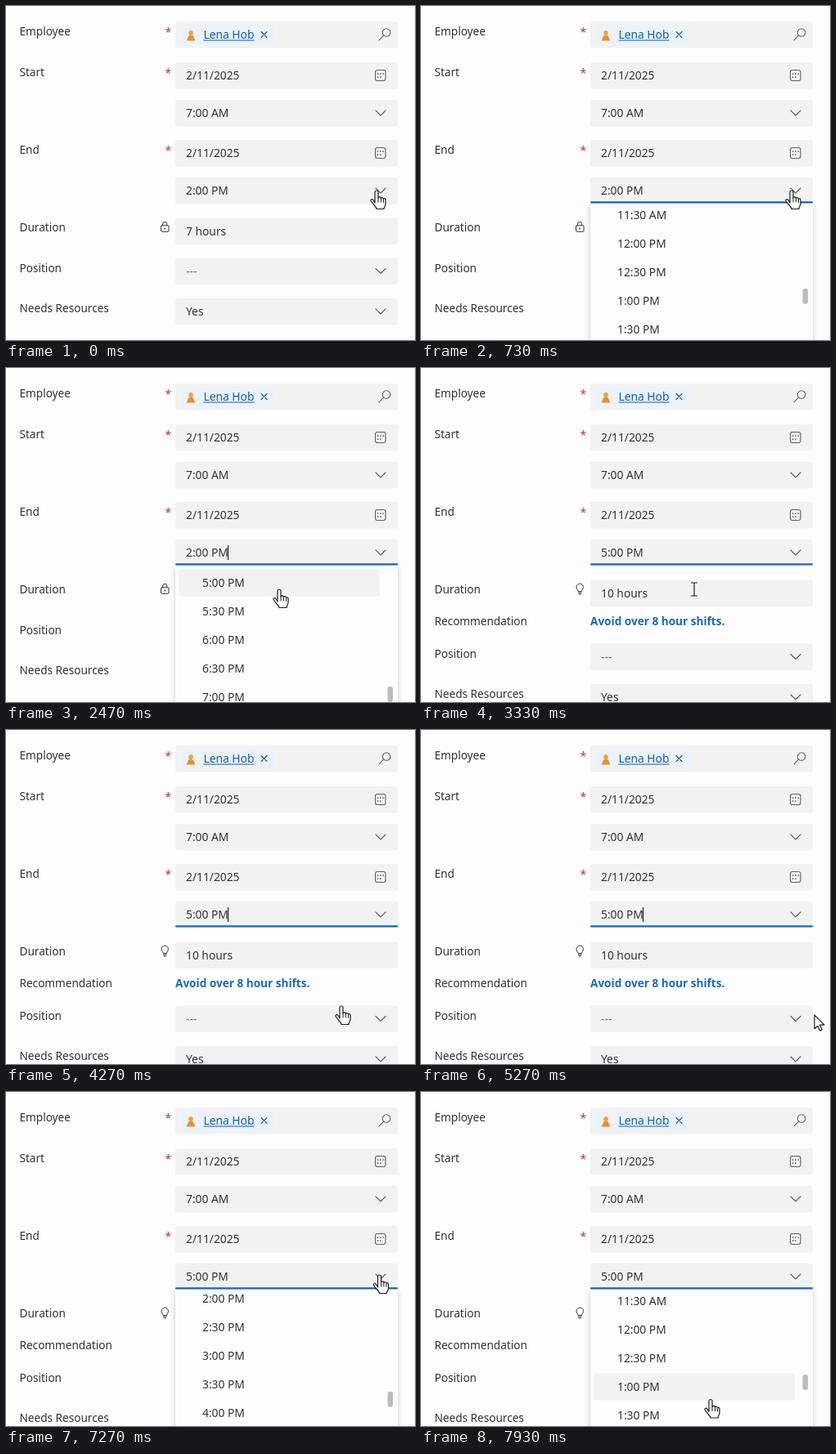
An HTML page with a canvas for the animation above (8000 ms loop, 500 px wide and 409 px high).

```html
<!DOCTYPE html>
<html lang="en">
<head>
<meta charset="utf-8">
<title>Shift form</title>
<style>
  html, body { margin: 0; width: 100%; height: 100%; overflow: hidden; background: #fefdfe; }
  canvas { display: block; width: 500px; height: 409px; }
</style>
</head>
<body>
<canvas id="stage"></canvas>
<script>
const W = 500, H = 409, LOOP = 8000;
const canvas = document.getElementById('stage');
const ctx = canvas.getContext('2d');
const ratio = window.devicePixelRatio || 1;
canvas.width = W * ratio;
canvas.height = H * ratio;

const INK = '#333133', ICON = '#5f5d60', FIELD = '#f3f2f3', BLUE = '#115ea3';
const FAMILY = '"Noto Sans", "Open Sans", sans-serif';
const ROW = 35, FIRST_ROW = 23, LIST_TOP = 242, SCROLLED = 378;

const HAND = new Path2D('M-2 15V2a2 2 0 0 1 4 0V9c0-1.5 3.2-1.5 3.4.4 .5-1.2 3-.9 3.1.9 .6-1 2.5-.6 2.5 1.2V16c0 3-2 4-2 6.5H0C0 20-4.5 17-7 12.5c-.6-1.6 1.6-2.6 2.8-1.2z');
const KNUCKLES = new Path2D('M2 9v5M5.4 10v4M8.5 11v3.5');
const ARROW = new Path2D('M0 0V17l4-3.8 2.6 6 2.6-1.1-2.6-6H12z');
const IBEAM = new Path2D('M-3.5-8H-1Q0-8 0-7Q0-8 1-8H3.5M0-7V7M-3.5 8H-1Q0 8 0 7Q0 8 1 8H3.5');

// time, shape, x, y
const CURSOR = [
  [0, 'hand', 453, 226], [2000, 'hand', 453, 226],
  [2440, 'hand', 334, 271], [2800, 'ibeam', 334, 271],
  [3870, 'ibeam', 334, 271], [4270, 'hand', 410, 338],
  [4600, 'hand', 464, 352], [4995, 'hand', 464, 352],
  [5000, 'arrow', 481, 357], [5265, 'arrow', 481, 357],
  [5270, 'arrow', 481, 349], [6000, 'arrow', 481, 349],
  [6200, 'hand', 465, 262], [6300, 'hand', 456.5, 224],
  [7700, 'hand', 456.5, 224], [7920, 'hand', 354, 376.5],
  [LOOP, 'hand', 354, 376.5]
];
const OPEN = [[200, 3330], [6330, LOOP]];
const CARET = [[870, 1400], [2000, 2530], [3870, 4400], [5000, 6930]];

const within = (spans, t) => spans.some(([a, b]) => t >= a && t < b);
const progress = (t, a, b) => Math.min(1, Math.max(0, (t - a) / (b - a)));
const ease = p => p * p * (3 - 2 * p);

function text(str, x, y, { size = 13.8, weight = 400, color = INK } = {}) {
  ctx.font = `${weight} ${size}px ${FAMILY}`;
  ctx.fillStyle = color;
  ctx.fillText(str, x, y);
  return ctx.measureText(str).width;
}

function box(x, y, w, h, r, color) {
  ctx.fillStyle = color;
  ctx.beginPath();
  ctx.roundRect(x, y, w, h, r);
  ctx.fill();
}

function stroke(d, color = ICON, width = 1.1) {
  ctx.strokeStyle = color;
  ctx.lineWidth = width;
  ctx.lineCap = ctx.lineJoin = 'round';
  ctx.stroke(d instanceof Path2D ? d : new Path2D(d));
}

const label = (str, mid) => text(str, 16.5, mid + 5, { size: 13.6 });
const required = mid => text('*', 194.5, mid + 6, { color: '#b8313a' });
const chevron = mid => stroke(`M452 ${mid - 3}l6 6 6-6`);

function field(mid, value, color) {
  box(207, mid - 16, 272, 32.5, 3, FIELD);
  if (value) text(value, 220, mid + 5, { color });
}

function calendar(mid) {
  stroke(`M454 ${mid - 6.5}h7.5a2.5 2.5 0 0 1 2.5 2.5v8a2.5 2.5 0 0 1-2.5 2.5h-7.5a2.5 2.5 0 0 1-2.5-2.5v-8a2.5 2.5 0 0 1 2.5-2.5z`);
  for (const [dx, dy] of [[0, -2], [3.3, -2], [6.6, -2], [0, 2], [3.3, 2]])
    box(453.7 + dx, mid + dy - .8, 1.8, 1.8, .9, ICON);
}

function dateField(mid) {
  field(mid, '2/11/2025');
  calendar(mid);
}

function selectField(mid, value, color) {
  field(mid, value, color);
  chevron(mid);
}

function employeeField() {
  field(35);
  box(213, 23, 115, 24.5, 3, '#ebf2fa');
  box(223.3, 30, 5.4, 6, 2.7, '#f0a13a');
  ctx.fillStyle = '#e8912d';
  ctx.fill(new Path2D('M223.5 36h5l3 6.5h-11z'));
  const width = text('Lena Hob', 241.5, 40, { color: BLUE });
  ctx.fillRect(241.5, 41.5, width, 1);
  stroke('M312 31.5l7 7M319 31.5l-7 7', BLUE);
  stroke('M460.3 32.5a4.8 4.8 0 1 0 9.6 0a4.8 4.8 0 1 0-9.6 0M461.5 36.2l-5.5 5.6');
}

function durationIcon(advised) {
  if (advised) {
    stroke('M192 273.2C192 271.5 190 271 190 268.3a4.2 4.2 0 0 1 8.4 0C198.4 271 196.4 271.5 196.4 273.2zM192.3 275.2h3.8M193 277h2.4', INK, 1);
  } else {
    stroke('M190.5 268.8h7.5a1 1 0 0 1 1 1v5.5a1 1 0 0 1-1 1h-7.5a1 1 0 0 1-1-1v-5.5a1 1 0 0 1 1-1zM191.7 268.5v-1.7a2.5 2.5 0 0 1 5 0v1.7', INK, 1);
    box(193.3, 271.6, 1.8, 1.8, .9, INK);
  }
}

function timeName(i) {
  const hour = Math.floor(i / 2);
  return `${hour % 12 || 12}:${i % 2 ? '30' : '00'} ${hour < 12 ? 'AM' : 'PM'}`;
}

function timeList(scroll, selected, cursor) {
  ctx.save();
  ctx.shadowColor = 'rgba(0,0,0,.22)';
  ctx.shadowBlur = 6 * ratio;
  ctx.shadowOffsetY = 2 * ratio;
  box(207, LIST_TOP, 272, 220, 3, '#fefdfe');
  ctx.restore();

  ctx.save();
  ctx.beginPath();
  ctx.rect(207, LIST_TOP, 272, H - LIST_TOP);
  ctx.clip();
  for (let i = 0; i < 48; i++) {
    const mid = 256 + (i - FIRST_ROW) * ROW - scroll;
    if (mid < LIST_TOP - 20 || mid > H + 20) continue;
    const hovered = cursor.y > LIST_TOP && cursor.x < 457 && Math.abs(cursor.y - mid) < ROW / 2;
    if (hovered) box(211, mid - 16.5, 246, 33, 3, '#f3f2f3');
    if (timeName(i) === selected) stroke(`M219.5 ${mid + .5}l3.6 3.7 8-8`, INK, 1.2);
    text(timeName(i), 240, mid + 5);
  }
  box(466.5, 346 + scroll / SCROLLED * 44, 6.5, 19, 3.2, '#bdbbbd');
  ctx.restore();
}

function cursorAt(t) {
  const i = CURSOR.findIndex(key => key[0] > t) - 1;
  const [t0, shape, x0, y0] = CURSOR[i], [t1, , x1, y1] = CURSOR[i + 1];
  const p = ease(progress(t, t0, t1));
  return { shape, x: x0 + (x1 - x0) * p, y: y0 + (y1 - y0) * p };
}

function drawCursor({ shape, x, y }) {
  ctx.save();
  ctx.translate(x, y);
  if (shape === 'ibeam') {
    stroke(IBEAM, '#222', 1.2);
  } else {
    const path = shape === 'hand' ? HAND : ARROW;
    ctx.fillStyle = '#fff';
    ctx.fill(path);
    stroke(path, '#1c1c1c', 1.2);
    if (shape === 'hand') stroke(KNUCKLES, '#1c1c1c', 1);
  }
  ctx.restore();
}

function draw(t) {
  const advised = t >= 3330;
  const endTime = advised ? '5:00 PM' : '2:00 PM';
  const shift = advised ? 29 : 0;
  const cursor = cursorAt(t);

  ctx.setTransform(ratio, 0, 0, ratio, 0, 0);
  ctx.fillStyle = '#fefdfe';
  ctx.fillRect(0, 0, W, H);
  ctx.fillStyle = '#ececec';
  ctx.fillRect(499, 0, 1, H);

  label('Employee', 31);
  label('Start', 81);
  label('End', 176);
  label('Duration', 271);
  label('Position', 320.5 + shift);
  label('Needs Resources', 370 + shift);
  [31, 81, 176].forEach(required);
  durationIcon(advised);

  employeeField();
  dateField(85);
  selectField(131, '7:00 AM');
  dateField(180);
  selectField(226, endTime);
  field(275.5, advised ? '10 hours' : '7 hours');
  if (advised) {
    label('Recommendation', 310);
    text('Avoid over 8 hour shifts.', 207, 315, { size: 13.6, weight: 600, color: '#1f69ae' });
  }
  selectField(324.5 + shift, '---', '#706e70');
  selectField(374 + shift, 'Yes');

  const scroll = SCROLLED * (ease(progress(t, 1370, 1670)) - ease(progress(t, 6840, 7670)));
  if (within(OPEN, t)) timeList(scroll, endTime, cursor);

  const focus = ease(progress(t, 70, 270));
  if (focus > 0) box(343 - 136 * focus, 239.3, 272 * focus, 2.2, 1, '#1a66b3');
  if (within(CARET, t)) {
    ctx.fillStyle = '#111';
    ctx.fillRect(271, 217, 1, 18);
  }
  drawCursor(cursor);
}

function tick() {
  draw(performance.now() % LOOP);
  requestAnimationFrame(tick);
}
tick();
</script>
</body>
</html>
```
